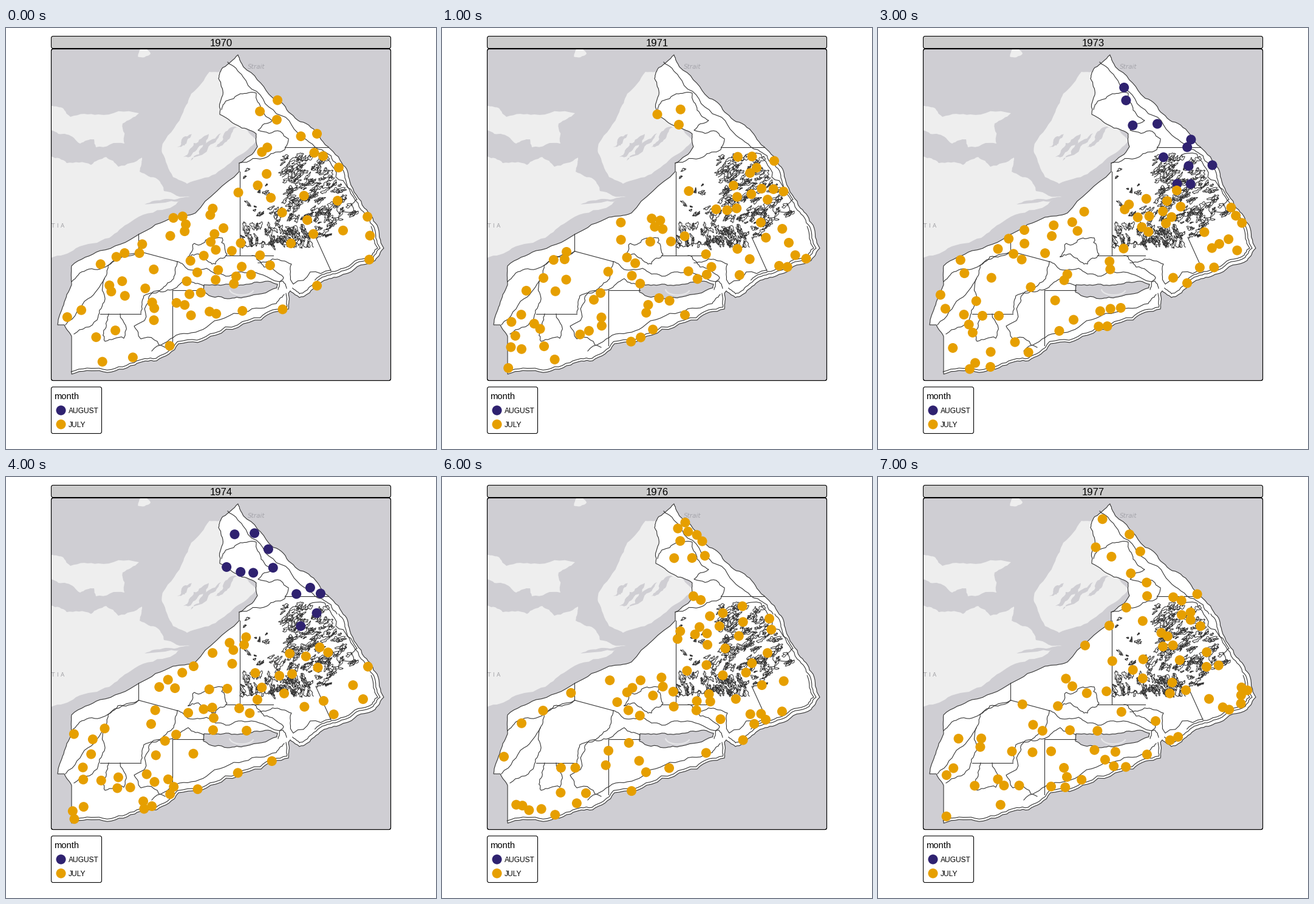
A matplotlib script for the animation above (8000 ms loop, 708 by 692 pixels).

```python
import numpy as np
import matplotlib.pyplot as plt
from matplotlib.animation import FuncAnimation
from matplotlib.patches import FancyBboxPatch, Polygon
from matplotlib.path import Path

W, H = 708, 692
PX = 0.72  # points per pixel at 100 dpi
JULY, AUGUST = "#E69F00", "#2F2270"
SEA, LAND, INK = "#CFCED3", "#EEEEEE", "#333333"
FIRST, YEARS, STATIONS = 1970, 8, 80
rng = np.random.default_rng(12)

fig = plt.figure(figsize=(W / 100, H / 100), dpi=100, facecolor="white")
ax = fig.add_axes([0, 0, 1, 1])
ax.set_xlim(0, W)
ax.set_ylim(H, 0)
ax.axis("off")


def rough(pts, amp=0.1, rounds=3):
    """Split every segment and push the midpoints sideways."""
    pts = np.array(pts, float)
    for _ in range(rounds):
        d = np.diff(pts, axis=0)
        side = np.c_[-d[:, 1], d[:, 0]] * rng.uniform(-amp, amp, (len(d), 1))
        out = np.empty((2 * len(pts) - 1, 2))
        out[::2], out[1::2] = pts, pts[:-1] + d / 2 + side
        pts = out
    return pts


def inset(pts, dist):
    """Shift a clockwise coast towards the inside of the shelf."""
    t = np.gradient(pts, axis=0)
    t = np.stack([np.convolve(c, np.ones(9), "same") for c in t.T], 1)
    t /= np.hypot(*t.T)[:, None]
    return pts + dist * np.c_[-t[:, 1], t[:, 0]]


def stroke(pts):
    ax.plot(*np.transpose(pts), color=INK, lw=1.1 * PX, zorder=4)


def contour(*pts, amp=0.12):
    stroke(rough(pts, amp))


def area(pts, fill, edge="none", z=2):
    patch = ax.add_patch(Polygon(pts, fc=fill, ec=edge, lw=1.1 * PX, zorder=z))
    patch.set_clip_path(panel)


def box(x, y, w, h, fill, z=0):
    return ax.add_patch(FancyBboxPatch(
        (x, y), w, h, boxstyle="round,pad=0,rounding_size=3",
        fc=fill, ec="black", lw=1.1 * PX, zorder=z))


def label(x, y, s, px, color="black", font="Liberation Sans", z=9, **kw):
    return ax.text(x, y, s, size=px * PX, color=color, family=font,
                   va="baseline", zorder=z, **kw)


# panel, strip and legend
panel = box(74.5, 34.5, 559, 545, SEA)
box(74.5, 34.5, 559, 545, "none", 8)
box(74.5, 13.5, 559, 20, "#CCCCCC", 8)
title = label(354, 30, "", 16.6, ha="center")
box(74.5, 590, 83, 76.5, "white")
label(79, 610, "month", 14.7)
for y, name, color in [(628.3, "AUGUST", AUGUST), (651.3, "JULY", JULY)]:
    ax.scatter(89.8, y, s=(16 * PX) ** 2, color=color, lw=0)
    label(102.5, y + 4.5, name, 12)

# base map
area(rough([(74, 128), (95, 133), (106, 146), (152, 142), (219, 140), (192, 157),
            (195, 190), (148, 196), (145, 183), (122, 190), (100, 175), (74, 168)]), LAND)
area(rough([(74, 211), (100, 222), (140, 225), (165, 212), (185, 228), (224, 213),
            (220, 236), (250, 249), (260, 268), (303, 277), (265, 297), (205, 319),
            (170, 345), (115, 362), (74, 378)]), LAND)
area(rough([(352, 72), (335, 72), (305, 108), (292, 138), (258, 190), (257, 205),
            (275, 245), (298, 256), (345, 240), (383, 210), (412, 185), (397, 168),
            (356, 140), (360, 90)], 0.06), LAND)
area(rough([(222, 34), (217, 47), (228, 48), (238, 42), (232, 34)]), LAND)
for x, y, reach in [(292, 212, 42), (304, 218, 50), (344, 196, 36), (282, 196, 24)]:
    tip = (x + reach, y - reach * 0.9)
    area(rough([(x, y), (x + reach / 2 - 4, y - reach / 2 - 2), tip,
                (x + reach / 2 + 3, y - reach / 2 + 6), (x, y)], 0.2), SEA)
area(rough([(228, 290), (262, 281), (302, 278), (262, 287)]), SEA)
for x, c in zip((74.5, 83, 90), "TIA"):
    label(x, 328, c, 9, "#A0A0A4", "DejaVu Sans", 3)
label(398, 67, "Strait", 10.5, "#A6A6AC", "DejaVu Sans", 3, style="italic")

# surveyed shelf, clockwise from its northern tip
east = rough([(382, 44), (391, 64), (433, 109), (462, 134), (494, 157), (522, 187),
              (553, 222), (566, 252), (590, 296), (611, 324), (622, 362), (608, 382),
              (563, 403), (532, 412), (504, 430), (483, 443), (468, 432)])
south = rough([(465, 436), (465, 462), (420, 480), (345, 505), (284, 519), (248, 547),
               (212, 554), (160, 565), (108, 569)])
west = rough([(108, 507), (96, 488), (85, 488), (95, 455), (108, 422), (108, 391),
              (155, 366), (219, 339), (275, 311), (312, 304), (384, 236)], 0.05)
north = rough([(384, 222), (414, 195), (412, 174), (381, 160), (352, 142),
               (357, 110), (350, 83), (357, 65), (382, 44)])
shelf = np.vstack([east, south, west, north])
area(shelf, "white", INK, 3)

trench = rough([(326, 422), (362, 421), (400, 421), (436, 417), (447, 421), (446, 427),
                (395, 442), (365, 445), (325, 434), (326, 422)])
area(trench, SEA, INK, 4)
t = np.linspace(0.1, 0.95, 20) * np.pi
ax.plot(388 + 20 * np.cos(t), 429 + 10 * np.sin(t), color="#E6E6E8", lw=1.6, zorder=5)

# straight stratum limits
for limit in [
    [(384.5, 236), (384.5, 373)],
    [(362, 373.5), (440, 373.5)],
    [(459, 195.5), (531, 195.5)],
    [(510, 344), (535, 399)],
    [(218.5, 339), (218.5, 367), (282, 384)],
    [(326, 430.5), (273.5, 430.5), (273.5, 522)],
    [(155, 469.5), (222, 469.5)],
]:
    stroke(limit)

# depth contours: some follow the coast, the others have key points
stroke(inset(east[48:], 6))
stroke(inset(east[72:110], 10))
stroke(inset(south, 4))
contour((365, 56), (390, 80), (433, 130), (480, 172), (520, 200), (545, 225))
contour((355, 134), (362, 120), (386, 108), (412, 107), (420, 135), (439, 152),
        (415, 168), (452, 170), (465, 182), (459, 200), (430, 212), (384, 222))
contour((98, 488), (135, 445), (162, 412), (168, 391), (219, 367))
contour((108, 417), (132, 398), (168, 390), (184, 376), (218, 367))
contour((162, 412), (162, 450), (150, 480), (112, 503))
contour((222, 469), (227, 440), (258, 428), (276, 412), (282, 384))
contour((169, 470), (163, 495), (163, 515), (194, 510), (188, 470), amp=0.2)
contour((274, 430), (243, 433), (235, 450), (211, 490), (222, 511), (262, 525), amp=0.2)
contour((300, 376), (310, 354), (335, 346), (356, 345), (364, 372), (345, 388),
        (325, 378), (300, 376), amp=0.25)
contour((282, 384), (300, 397), (330, 395), (362, 408), (404, 401), (456, 416), (462, 428))
contour((326, 424), (300, 412), (274, 430))
contour((405, 374), (425, 393), (457, 410), (448, 430), amp=0.2)
contour((415, 386), (447, 380), (470, 388), (473, 421), (535, 398), amp=0.15)
contour((240, 531), (280, 505), (330, 492), (392, 467), (445, 453), (458, 438))
contour((455, 245), (478, 213), (510, 206), (543, 245), (578, 282), (570, 303),
        (534, 290), amp=0.25)
contour(*[(x, 350 + rng.uniform(-9, 13)) for x in range(386, 512, 6)], amp=0.3)


def scribbles(n, x0, x1, y0, y1, tilt, size):
    """Small ragged closed contours leaning the same way."""
    a = np.linspace(0, 2 * np.pi, 25)
    for _ in range(n):
        y = rng.uniform(y0, y1)
        x = rng.uniform(x0, min(x1, 515 + 0.6 * (y - 200)))
        r = 1 + sum(0.3 * np.sin(k * a + rng.uniform(0, 6.3)) for k in (2, 3, 5))
        long = size * rng.uniform(0.4, 1.3)
        u, v = long * r * np.cos(a), long * rng.uniform(0.3, 0.6) * r * np.sin(a)
        th = np.radians(tilt + rng.normal(0, 22))
        ax.plot(x + u * np.cos(th) - v * np.sin(th), y + u * np.sin(th) + v * np.cos(th),
                color=INK, lw=PX, zorder=4)


scribbles(16, 392, 445, 225, 312, -15, 3.5)
scribbles(45, 455, 535, 208, 262, -35, 5.5)
scribbles(70, 465, 575, 240, 315, -35, 5.5)
scribbles(25, 432, 500, 280, 325, -40, 5)
scribbles(26, 495, 540, 300, 342, -20, 4)
scribbles(75, 388, 500, 324, 358, 68, 5)

# where the survey ran into August; everywhere else it was July
august = {
    1972: lambda x, y: (x < 235) & (y > 353 + 0.45 * x),
    1973: lambda x, y: y < 262,
    1974: lambda x, y: y < 102 + 0.3 * x,
    1975: lambda x, y: (x > 310) & (y < 350 + 0.15 * x),
}


def survey(year):
    """Random, loosely spaced stations on the shelf."""
    pick = np.random.default_rng(year)
    inside, hole = Path(shelf), Path(trench)
    low, high = shelf.min(0) + 8, shelf.max(0) - 5
    found = np.empty((0, 2))
    while len(found) < STATIONS:
        p = pick.uniform(low, high)
        free = np.all(np.hypot(*(found - p).T) > 10)
        if free and inside.contains_point(p) and not hole.contains_point(p):
            found = np.vstack([found, p])
    late = august.get(year, lambda x, y: x < 0)(*found.T)
    return found, np.where(late, AUGUST, JULY)


surveys = [survey(FIRST + i) for i in range(YEARS)]
dots = ax.scatter([], [], s=(16 * PX) ** 2, lw=0, zorder=7)


def draw(i):
    places, colors = surveys[i]
    title.set_text(str(FIRST + i))
    dots.set_offsets(places)
    dots.set_facecolors(list(colors))
    return title, dots


anim = FuncAnimation(fig, draw, frames=YEARS, interval=1000, repeat=True, repeat_delay=0)
plt.show()
```
